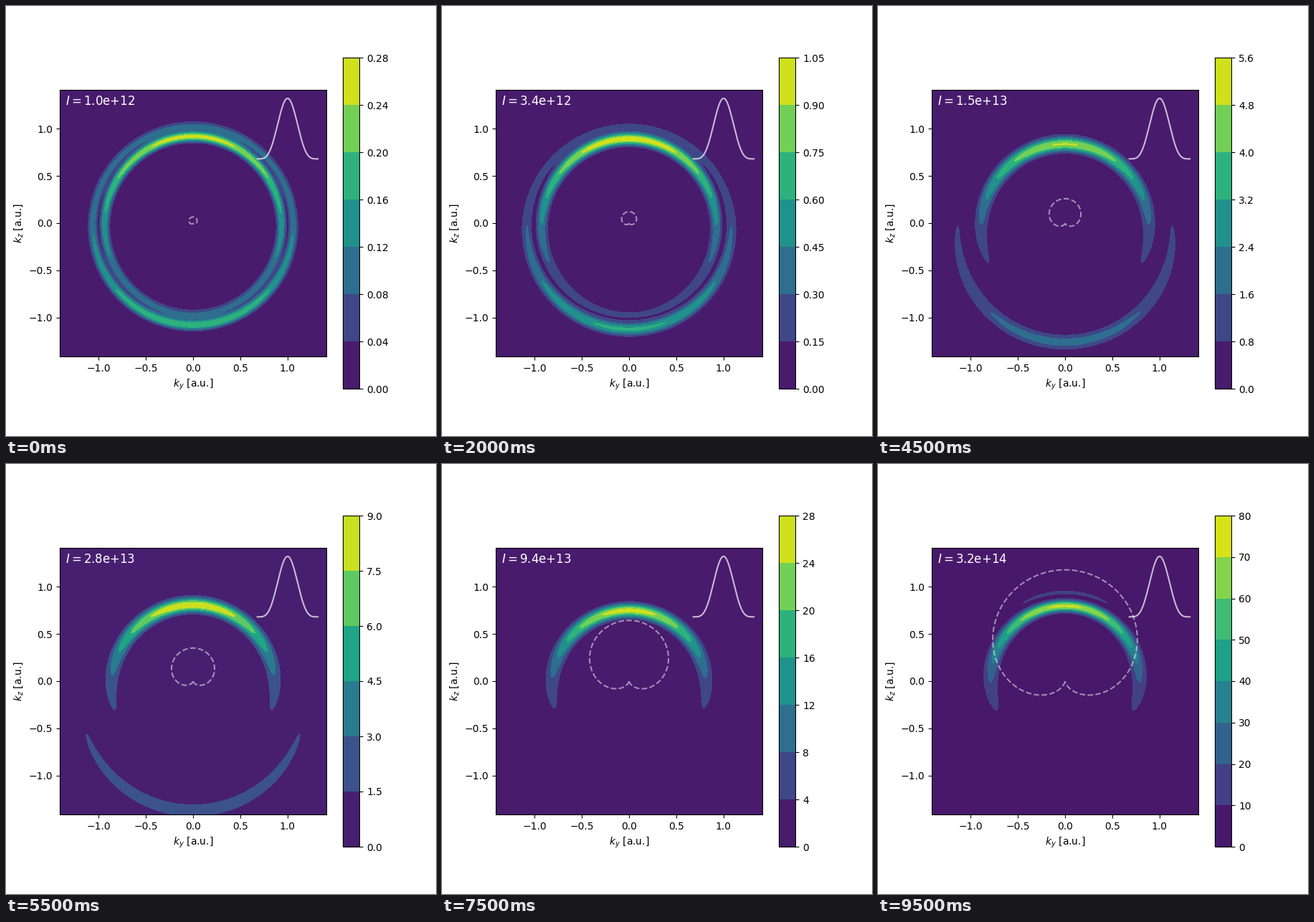
Recreate the animation shown at these times as a matplotlib script. Size 600 px wide and 600 px high, loop 10 s.

```python
import numpy as np
import matplotlib.pyplot as plt
from matplotlib.animation import FuncAnimation

plt.rcParams["font.family"] = "DejaVu Sans"

N_FRAMES = 20
OMEGA = 0.057  # laser frequency in a.u.
K_MAX = 1.41

axis = np.linspace(-K_MAX, K_MAX, 300)
KY, KZ = np.meshgrid(axis, axis)
K = np.hypot(KY, KZ)
COS = KZ / K
phase = np.linspace(-np.pi, np.pi, 400)
envelope = np.cos(phase / 2) ** 2


def intensity(frame):
    return 10 ** (12 + 2.5 * frame / (N_FRAMES - 1))


def vector_potential(frame):
    return np.sqrt(intensity(frame) / 3.51e16 / 2) / OMEGA


def ring(log_amp, radius, width):
    return np.exp(log_amp - 0.5 * ((K - radius) / width) ** 2)


def inner_ring(a, width):
    """Upper crescent: drawn inwards and focused to the top as the field grows."""
    top = 0.742 + 0.345 * (a - 0.78) ** 2
    side = 0.77 + 0.178 / (1 + (a / 0.36) ** 2)
    drop = 1 - COS
    log_amp = -1.25 * np.tanh(5 * a) * drop * (2 + drop) / 3
    return ring(log_amp, side + (top - side) * COS, width - 0.017 * a * COS)


def outer_ring(a, width):
    """Lower crescent: pushed outwards and fading as the field grows."""
    radius = 1.03 + 0.3 * (a + a**2) - (0.35 * a + 0.6 * a**2) * COS
    log_amp = -2 * np.tanh(5 * a) - 20 * a**4 - np.tanh(6 * a) * COS
    return ring(log_amp, radius, width)


def spectrum(frame):
    a = vector_potential(frame)
    width = 0.06 - 0.04 * np.exp(-a / 0.12)
    inner, outer = inner_ring(a, width), outer_ring(a, width)
    # The rings interfere destructively at the sides
    z = inner + outer - 1.4 * (1 - COS**2) * np.sqrt(inner * outer)
    z += 0.085 * a**4 * ring(1.4 * (COS - 1), 0.94, 0.025)
    peak = 0.255 + 0.063 * np.sin(np.pi * frame / 16.5)
    return (z / z.max() + 1e-6) * peak * intensity(frame) / 1e12


fig = plt.figure(figsize=(6, 6), dpi=100)


def draw(frame):
    fig.clear()
    ax = fig.add_axes([0.125, 0.11, 0.62, 0.77])
    cax = fig.add_axes([470.25 / 600, 0.11, 23.1 / 600, 0.77])

    filled = ax.contourf(KY, KZ, spectrum(frame))
    fig.colorbar(filled, cax=cax)

    path = vector_potential(frame) * envelope
    ax.plot(path * np.sin(phase), path * np.cos(phase), "--",
            color="white", alpha=0.5)
    ax.plot(1 + 0.32 * phase / np.pi, 0.68 + 0.64 * envelope**2,
            color="white", alpha=0.7)
    ax.text(-1.35, 1.25, f"$I=${intensity(frame):.1e}", color="white", fontsize=12)

    ax.set_aspect("equal")
    ax.set_xlim(-K_MAX, K_MAX)
    ax.set_ylim(-K_MAX, K_MAX)
    ax.set_xlabel("$k_y$ [a.u.]")
    ax.set_ylabel("$k_z$ [a.u.]")
    return []


anim = FuncAnimation(fig, draw, frames=N_FRAMES, interval=500,
                     init_func=lambda: [], repeat=True, repeat_delay=0)
plt.show()
```
